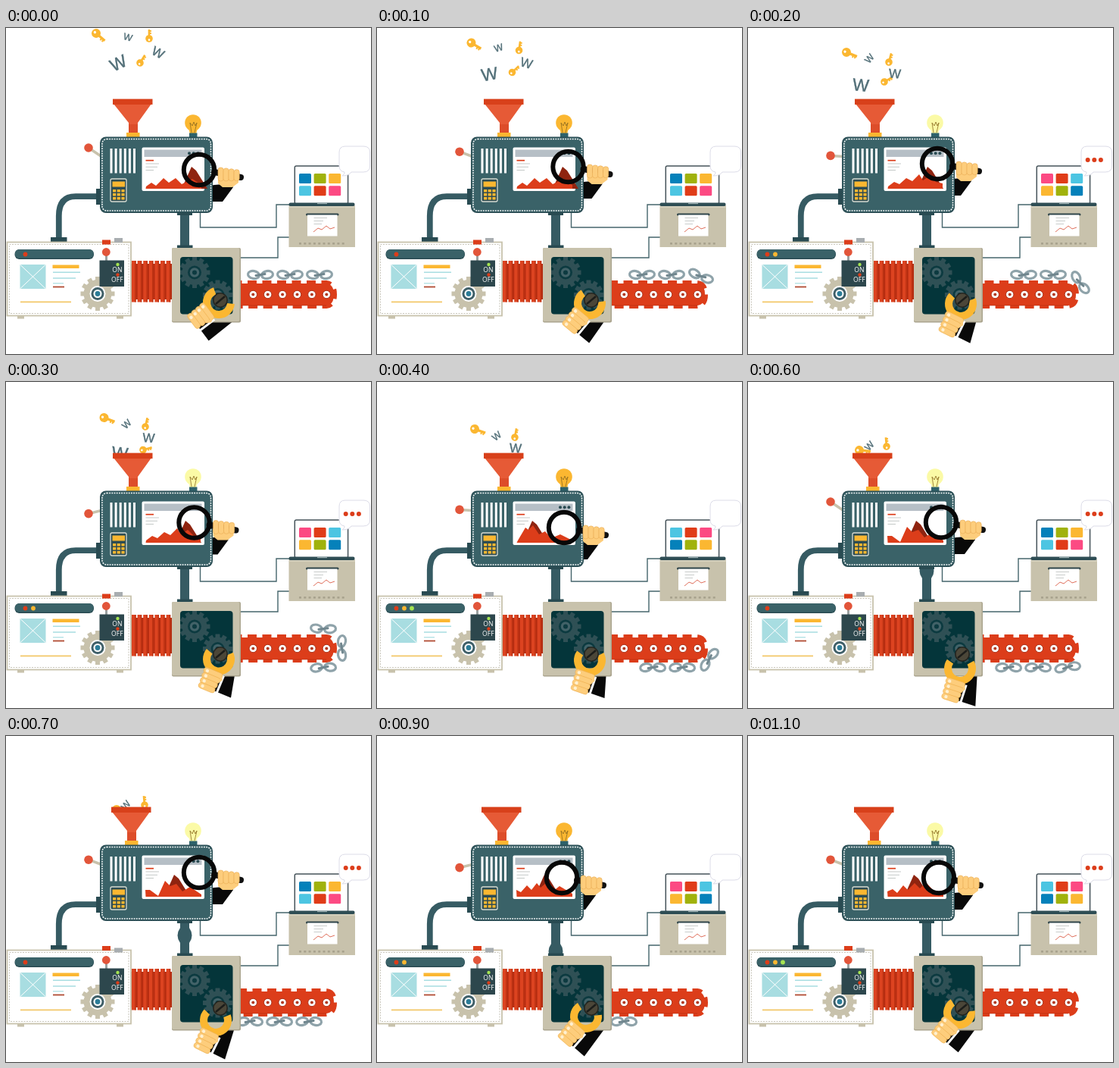
An HTML page for the animation above (1200 ms loop, 482 by 430 pixels).

```html
<!DOCTYPE html>
<html lang="en">
<head>
<meta charset="utf-8">
<title>Idea machine</title>
<style>
html, body { margin: 0; width: 100%; height: 100%; overflow: hidden; background: #fff; }
svg { display: block; width: 482px; height: 430px; }
text { font-family: "Open Sans", "Noto Sans", sans-serif; }
.letter { font-family: "Liberation Sans", Arial, sans-serif; }
</style>
</head>
<body>
<svg id="stage" viewBox="0 0 482 430"></svg>
<script>
const TEAL = '#3a6268', DEEP = '#294b52', RED = '#dc3d1a', ORANGE = '#fbb731',
      BEIGE = '#c8c2ac', SKIN = '#fdcd7c', CYAN = '#a8dde1', STEEL = '#8fa3aa';
const STEP = 100, STEPS = 12;

// Markup helpers
const rect = (x, y, w, h, fill, more = '') => `<rect x="${x}" y="${y}" width="${w}" height="${h}" fill="${fill}" ${more}/>`;
const dot = (x, y, r, fill, more = '') => `<circle cx="${x}" cy="${y}" r="${r}" fill="${fill}" ${more}/>`;
const line = (d, stroke, w = 1, more = '') => `<path d="${d}" fill="none" stroke="${stroke}" stroke-width="${w}" ${more}/>`;
const shape = (d, fill, more = '') => `<path d="${d}" fill="${fill}" ${more}/>`;
const range = (n, fn) => Array.from({ length: n }, (_, i) => fn(i)).join('');
const group = (id, body, more = '') => `<g id="${id}" ${more}>${body}</g>`;

function gear(x, y, r, teeth, fill, hub) {
  const tooth = i => rect(-3, -r, 6, 8, fill, `transform="rotate(${i * 360 / teeth})"`);
  return `<g transform="translate(${x} ${y})">` + dot(0, 0, r - 4, fill) + range(teeth, tooth) + hub + '</g>';
}

function keyShape(id, r, len) {
  return group(id, dot(0, 0, r, ORANGE) + dot(-r * .35, 0, r * .28, '#fff') +
    line(`M${r - 1} 0H${len}`, ORANGE, r * .55) +
    line(`M${len - 2} 0v${r * .6}M${len - 5} 0v${r * .6}`, ORANGE, 2));
}
const letter = (id, size) => group(id,
  `<text class="letter" text-anchor="middle" y="${size * .36}" font-size="${size}" fill="#526f78" stroke="#526f78" stroke-width=".4">W</text>`);

function fallingItems() {
  return group('items', keyShape('keyA', 6, 15) + keyShape('keyB', 4.8, 12) + keyShape('keyC', 4.8, 12) +
    letter('w1', 12.5) + letter('w2', 17) + letter('w3', 23), 'clip-path="url(#mouth)"');
}

function funnel() {
  return group('funnel',
    shape('M142 100H192L174 125V139H162V125Z', '#e65a36') +
    shape('M162 127H174V139H162Z', '#dd4d2a') +
    rect(141, 93.6, 52.5, 7.4, '#d8401a') + rect(159, 138, 17.5, 6, ORANGE));
}

function bulb() {
  return dot(247, 125, 10.8, ORANGE, 'id="glass"') + shape('M241 132H253L251 140H243Z', ORANGE, 'id="neck"') +
    line('M245 138L243 125L246 129L248 124L250 129L252 125L249 138', '#8c6a20', .8) +
    rect(242, 138.5, 10.5, 6, '#2e626b');
}

function mainMachine() {
  const keys = range(9, i => rect(141 + i % 3 * 5.7, 213 + (i / 3 | 0) * 5, 4.2, 3.5, ORANGE));
  return rect(124, 143.5, 149, 100.5, DEEP, 'rx="8"') + rect(125, 144.5, 147, 98, TEAL, 'rx="8"') +
    rect(127, 146.5, 143.5, 94.5, 'none', 'rx="6" stroke="#fff" stroke-width="1.5" stroke-dasharray="1.8 1.4"') +
    range(6, i => rect(137.5 + i * 6.1, 159, 3, 32.5, '#fff')) +
    rect(138, 199, 21, 30, '#2d4c53', 'rx="2" stroke="#d8dcd2" stroke-width="1.3"') +
    rect(140.5, 202.5, 16.5, 7, ORANGE) + keys +
    rect(179.5, 157.5, 82.5, 57.5, '#fff', 'rx="2"') + rect(182.5, 160.5, 76, 9.5, '#b6bfc6') +
    range(3, i => dot(242 + i * 5.7, 165.3, 2, DEEP)) +
    line('M184.5 174.7H195', RED, 1.7) + line('M184.5 179H202M184.5 183.3H200M184.5 187.5H195', '#c4c9c7', 1) +
    shape('', '#8f2410', 'id="chartBack"') + shape('', RED, 'id="chart"');
}

function lens() {
  const fingers = range(4, i => `<rect x="${25 + i * 7}" y="${-3 + i * .9}" width="7.2" height="${18 - i}" rx="3.4" fill="${SKIN}" stroke="#e9ab55" stroke-width=".6"/>`);
  return line('M20 3L55 10', '#111', 8, 'stroke-linecap="round"') +
    shape('M25 8V18L31 23H44L52 17V8Z', SKIN) + fingers +
    dot(0, 0, 20.2, 'none', 'stroke="#080808" stroke-width="6"');
}

function leftMachine() {
  const hub = dot(0, 0, 10.5, '#fff') + dot(0, 0, 8.5, '#3f5f68') + dot(0, 0, 5.5, '#fff') + dot(0, 0, 3.4, '#2b7c97');
  return rect(15, 379, 9, 4.5, BEIGE) + rect(146, 379, 9, 4.5, BEIGE) +
    rect(1.5, 282.5, 163.5, 97, '#fff', `stroke="${BEIGE}" stroke-width="1.8"`) +
    rect(4.5, 285.5, 157.5, 91, 'none', 'stroke="#b9b5a8" stroke-width=".8" stroke-dasharray="2 1.5"') +
    rect(127, 277, 11, 6, RED, 'id="btnA"') + rect(143, 277, 11, 6, '#a8adb0', 'id="btnB"') +
    rect(11.5, 292, 104.5, 13, DEEP, 'rx="6"') + rect(12, 292, 103.5, 11.5, TEAL, 'rx="5.5"') +
    dot(25.5, 298.5, 2.9, RED) + dot(36, 298.5, 2.9, ORANGE, 'id="lampB"') + dot(46, 298.5, 2.9, '#a5e452', 'id="lampC"') +
    rect(18.5, 312, 34, 32, CYAN) + line('M18.5 312L52.5 344M52.5 312L18.5 344', '#fff', 1) +
    rect(61.5, 312.5, 35, 4.5, ORANGE) + line('M62 322.3H98M62 330H92', CYAN, 1.6) +
    line('M62 336.8H76', CYAN, 1.2) + line('M62 341.5H77', '#b04a32', 1.8) + line('M19 361.3H86', '#f3c768', 1.7) +
    gear(121, 350.5, 22.5, 12, BEIGE, hub) +
    rect(131, 299, 3, 9, '#9aa0a0') + dot(132.3, 295.5, 5.4, '#e2553a') +
    rect(123.5, 306.5, 32.5, 34.5, '#2d474d') + dot(147.5, 312, 2.2, '#a5e452') + dot(147.5, 325.5, 2.2, RED) +
    '<text x="140.3" y="322" font-size="8.6" fill="#fff">ON</text><text x="139" y="335.3" font-size="8.6" fill="#fff">OFF</text>';
}

function pipes() {
  return line('M122 222.2H92Q69.8 222.2 69.8 248V278', '#365b63', 7.8) +
    rect(119, 212, 6, 21, DEEP) + rect(59, 276, 21.5, 6.5, DEEP) +
    rect(230, 243, 12, 46, '#365b63') + shape('', '#365b63', 'id="bulge"') +
    rect(226, 243, 20, 4, DEEP) + rect(226, 286.5, 20.5, 4.5, DEEP) +
    line('M256.5 243V263H357V233H374M309 303H359V276H374', '#45656c', 1.4);
}

function bellows() {
  return rect(165, 311, 54, 47, '#b32b10') +
    range(7, i => rect(166 + i * 7.6, 307, 5.6, 54.5, '#dc4320') + rect(170.2 + i * 7.6, 307, 1.4, 54.5, '#bb3213'));
}

function chainLink() {
  const loop = (x, a) => `<ellipse cx="${x}" rx="7.5" ry="5" transform="rotate(${a} ${x} 0)" fill="none" stroke="${STEEL}" stroke-width="3.2"/>`;
  return loop(-9, 10) + loop(9, -10) + line('M-6 1L6 -1', '#70868e', 3, 'stroke-linecap="round"');
}

function belt() {
  const outline = 'M308 337H423Q433 338 433 351.5Q433 365 423 366H308';
  return line(outline, RED, 8, 'id="teeth" stroke-dasharray="12 7.5"') + shape(outline + 'Z', RED) +
    line('M310 366H423', '#b32b10', 1, 'opacity=".6"') +
    range(6, i => dot(326.3 + i * 19.4, 351.5, 5.2, '#fff', 'stroke="#a82b12" stroke-width="1"') + dot(326.3 + i * 19.4, 351.5, 2, '#b33a22'));
}

function box() {
  const hub = dot(0, 0, 9, '#0c3a40') + dot(0, 0, 6.2, '#426268') + dot(0, 0, 3, '#0c3a40');
  return rect(219, 290, 91, 98.5, '#aaa48e', 'rx="2"') + rect(219, 290, 89.5, 97, BEIGE, 'rx="2"') +
    rect(230, 302, 69.5, 75.5, '#04353a', 'rx="4"') +
    '<g clip-path="url(#window)">' + gear(249, 322.5, 20.5, 12, '#2f5055', hub) +
    gear(279.5, 352, 19.5, 12, '#2f5055', hub) + '</g>';
}

function wrench() {
  const fingers = range(4, i => rect(16 + i * 7, -13 + i * .6, 7.6, 26 - i, SKIN, 'rx="3.6" stroke="#eeb050" stroke-width=".6"') +
    dot(20 + i * 7, 8 - i * .6, 2.2, '#fff0d0'));
  // The jaw is tilted against the handle
  return line('M-8.6 -13.5A16 16 0 1 1 -8.6 13.5', ORANGE, 10, 'transform="rotate(-15)"') +
    line('M17 0H44', ORANGE, 12) + line('M18 -14.5H43', '#fff', 3) + fingers + shape('M16 -11L24 -15L30 -11Z', SKIN);
}

function laptop() {
  return rect(381.3, 182, 70.3, 50, '#fff', 'rx="2" stroke="#46535a" stroke-width="1.5"') +
    range(6, i => rect(387 + i % 3 * 19.6, 192 + (i / 3 | 0) * 16.3, 16, 13, '#fff', `rx="1.5" id="tile${i}"`)) +
    rect(373.5, 234, 87.5, 55, BEIGE) + rect(373.5, 230.5, 87, 4.5, '#2e4d54', 'rx="2"') +
    rect(411, 230.5, 13, 1.6, '#9db0b2') + line('M374 236H461', '#e0dcca', 1) +
    rect(396, 244.5, 43.5, 3, '#2f454a', 'rx="1.5"') + rect(398, 246.5, 39.5, 28, '#fff') +
    line('M406.5 250.5H424M406.5 254.5H419M406.5 258.5H417', '#c9cccb', 1) +
    line('M406 269L412 264L417 266L423 261L428 265L434 263', '#e0705c', 1) +
    range(10, i => rect(387 + i * 6.3, 283, 3, 2.6, '#a8a28d')) +
    shape('M448 156H472Q480.5 156 480.5 164V182Q480.5 190 472 190H456Q453 195 444 195Q448 192 447 190Q440 189 440 182V164Q440 156 448 156Z', '#fff', 'stroke="#dcdce8" stroke-width="1"') +
    group('dots', range(3, i => dot(448.7 + i * 8.6, 174, 3, RED)));
}

const stage = document.getElementById('stage');
stage.innerHTML =
  `<defs><clipPath id="mouth">${rect(0, 0, 482, 95, '#000')}</clipPath>
   <clipPath id="window">${rect(230, 302, 69.5, 75.5, '#000', 'rx="4"')}</clipPath>
   <clipPath id="outside">${rect(309, 300, 173, 130, '#000')}</clipPath></defs>` +
  fallingItems() + funnel() + bulb() +
  line('', BEIGE, 3.5, 'id="stick"') + dot(109, 0, 5.8, '#e2553a', 'id="knob"') +
  pipes() + shape('M20 20L43 18L45 23L31 42H8V22Z', '#090909', 'id="sleeve"') + mainMachine() +
  bellows() + leftMachine() +
  `<g clip-path="url(#outside)">${range(3, i => group('chain' + i, chainLink()))}</g>` + belt() +
  line('', '#090909', 18, 'id="arm" stroke-linejoin="miter"') + box() +
  group('wrench', wrench()) +
  group('bolt', dot(0, 0, 10, '#24241f') + dot(0, 0, 8.4, '#4b4638') + line('M-6 5L6 -5', '#1c1d1a', 2.4), 'transform="translate(283 359)"') +
  laptop() + group('lens', lens());

const el = Object.fromEntries([...stage.querySelectorAll('[id]')].map(n => [n.id, n]));
const set = (id, attrs) => { for (const k in attrs) el[id].setAttribute(k, attrs[k]); };
const show = (id, on) => set(id, { visibility: on ? 'visible' : 'hidden' });

// Keys are [step, ...values]; values between them are linear
function at(keys, s) {
  const n = keys.findIndex(k => k[0] >= s);
  if (n < 0) return keys[keys.length - 1].slice(1);
  if (n === 0) return keys[0].slice(1);
  const a = keys[n - 1], b = keys[n], u = (s - a[0]) / (b[0] - a[0]);
  return a.slice(1).map((v, i) => v + (b[i + 1] - v) * u);
}

const falls = {
  keyA: [[0, 119, 7, 40], [2, 130, 32, 22], [4, 129, 62, 20], [6, 147, 90, 5], [7, 146, 97, 0], [8, 146, 108, 0]],
  keyB: [[0, 189, 14, -90], [2, 186, 45, -75], [4, 182, 73, -80], [6, 183, 85, -95], [7, 183, 91, -95], [9, 183, 112, -90]],
  keyC: [[0, 177, 46, -58], [2, 180, 71, -30], [4, 182, 108, 0]],
  w1: [[0, 161, 12, 15], [2, 160, 40, -50], [4, 158, 71, -38], [6, 160, 84, -48], [7, 158, 91, -50], [9, 158, 108, -50]],
  w2: [[0, 201, 32, 28], [2, 194, 60, 4], [4, 183, 87, 4], [6, 176, 112, 0]],
  w3: [[0, 148, 46, -25], [2, 149, 75, 5], [4, 152, 112, 8]]
};
const lensPath = [[0, 255, 187], [2, 250, 179], [4, 247, 192], [6, 255, 185], [7, 255, 180], [9, 244, 187], [11, 252, 187]];
const wrenchPath = [[0, 281, 362, 143], [2, 281, 364, 116], [4, 281, 367, 109], [6, 280, 378, 108],
  [7, 277, 375, 116], [9, 276, 370, 131], [11, 279, 365, 130]];
const chainPath = [[0, 414], [2, 442], [4, 552], [6, 572], [7, 594], [9, 668], [11, 750]];
const funnelPath = [[0, 0], [4, 0], [6, -3], [7, -2], [8, -3], [9, -3], [11, -1]];
const bulgeY = { 6: 249, 7: 263, 8: 273, 9: 284 };
const palettes = [
  ['#0581ba', '#a0b20c', '#fbb731', '#4cc5e2', '#e03c18', '#fc4a83'],
  ['#fc4a83', '#e03c18', '#4cc5e2', '#fbb731', '#a0b20c', '#0581ba'],
  ['#4cc5e2', '#e03c18', '#fc4a83', '#0581ba', '#a0b20c', '#fbb731']
];
// Ridge lines, one for every two steps
const ridges = [
  '185 209L192 204L198 208L208 198L215 204L224 198L232 206L246 199L258 207',
  '185 209L193 203L200 206L209 198L217 202L226 193L231 201L240 195L248 203L257 205',
  '186 209L196 192L200 195L206 189L214 201L222 197L230 206L242 201L258 209',
  '184 203L190 203L201 211L210 191L217 198L225 195L233 205L243 199L258 209',
  '184 203L190 206L198 197L204 203L211 194L216 200L223 194L232 205L241 198L258 208',
  '184 205L191 202L197 207L205 197L211 203L220 194L227 201L235 193L245 204L258 207'
];
const peaks = [246, 238, 206, 223, 222, 220];

// Along the top, round the end, back underneath
function chainPose(s) {
  const x = 418, y = 351, r = 25.5, arc = Math.PI * r;
  if (s < x) return [s, y - r, 0];
  if (s > x + arc) return [2 * x + arc - s, y + r, 180];
  const a = (s - x) / r - Math.PI / 2;
  return [x + r * Math.cos(a), y + r * Math.sin(a), a * 180 / Math.PI + 90];
}

const place = (id, [x, y, a = 0]) => set(id, { transform: `translate(${x} ${y}) rotate(${a})` });

function draw(s) {
  for (const id in falls) place(id, at(falls[id], s));
  place('funnel', [at(funnelPath, s)[0], 0]);

  const lit = s % 4 < 2, phase = (s >> 1) % 3;
  set('glass', { fill: lit ? ORANGE : '#fbfaa6' });
  set('neck', { fill: lit ? ORANGE : '#fbfaa6' });
  show('dots', !lit);
  show('lampB', phase > 0);
  show('lampC', phase > 1);
  palettes[phase].forEach((fill, i) => set('tile' + i, { fill }));

  const late = s > 6;
  set('btnA', { y: late ? 277 : 279.5 });
  set('btnB', { y: late ? 279.5 : 277 });

  const knob = 158 + 5.2 * (3 - Math.abs(3 - s % 6));
  set('knob', { cy: knob });
  set('stick', { d: `M109 ${knob}L126 169.5` });

  const n = s >> 1, p = peaks[n];
  set('chart', { d: `M184.5 212L${ridges[n]}V212Z` });
  set('chartBack', { d: `M${p - 14} 212L${p - 1} 183L${p + 5} 188L${p + 20} 212Z` });

  const pos = at(lensPath, s);
  place('lens', pos);
  place('sleeve', pos);

  const b = bulgeY[s];
  set('bulge', { d: b ? `M230 ${b - 10}Q223 ${b} 230 ${b + 10}H242Q249 ${b} 242 ${b - 10}Z` : '' });

  const lead = at(chainPath, s)[0];
  for (let i = 0; i < 3; i++) place('chain' + i, chainPose(lead - i * 39));
  set('teeth', { 'stroke-dashoffset': -11 - s % 3 * 6.5 });

  const [x, y, a] = at(wrenchPath, s);
  place('wrench', [x, y, a]);
  const c = Math.cos(a * Math.PI / 180), d = Math.sin(a * Math.PI / 180);
  const hx = x + 32 * c, hy = y + 32 * d;
  set('arm', { d: `M294 380L${hx + 23 * d} ${hy - 23 * c}L${hx + 8 * d} ${hy - 8 * c}` });
}

const start = performance.now();
function tick() {
  draw(Math.floor((performance.now() - start) / STEP) % STEPS);
  requestAnimationFrame(tick);
}
tick();
</script>
</body>
</html>
```
